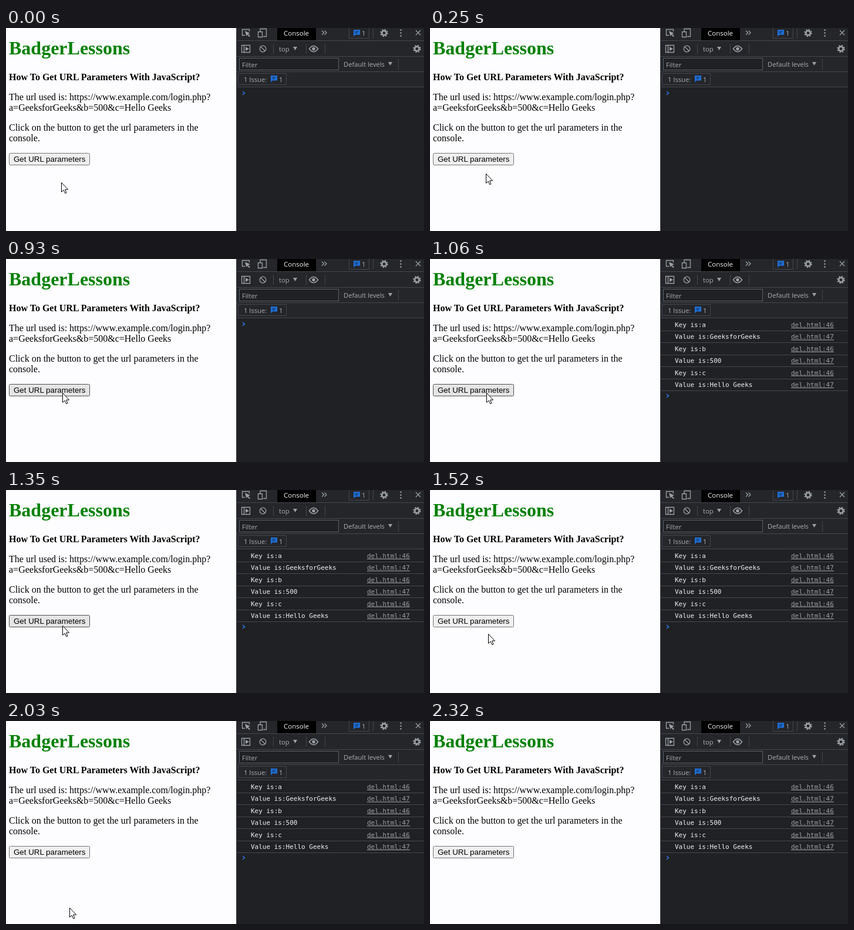
These frames come from a looping animation (712 by 346 pixels, 3.73 s). An HTML page:

```html
<!DOCTYPE html>
<html lang="en">
<head>
<meta charset="utf-8">
<title>URL parameters</title>
<style>
  html, body { margin: 0; width: 100%; height: 100%; overflow: hidden; background: #fdfdff; }
  svg { display: block; width: 100%; height: 100%; }
  text { white-space: pre; }
  .page { font: 16px "Liberation Serif", serif; }
  .ui { font: 11.2px "Open Sans", sans-serif; fill: #a8adb2; }
  .log { font: 11px "DejaVu Sans Mono", monospace; fill: #f0f1f3; }
  .link { fill: #9aa0a6; text-decoration: underline; }
  .icon { fill: none; stroke: #9aa0a6; stroke-width: 1.3; }
  .solid { fill: #9aa0a6; stroke: none; }
  .rule { fill: none; stroke: #44474e; }
  .blue { fill: #1f6fd8; }
  .prompt { fill: none; stroke: #367cf1; stroke-width: 1.4; }
</style>
</head>
<body>
<svg viewBox="0 0 712 346">
  <defs>
    <g id="gear">
      <circle r="3.7" fill="none" stroke="#9aa0a6" stroke-width="2.6"/>
      <circle r="5.7" fill="none" stroke="#9aa0a6" stroke-width="2" stroke-dasharray="2.4 2.077"/>
    </g>
    <g id="note">
      <path class="blue" d="M0 0H11V8.5H3L0 11.5Z"/>
      <path d="M2.5 3H8.5M2.5 5.5H7" stroke="#10243c"/>
    </g>
    <path id="down" class="solid" d="M0 0H7L3.5 6Z"/>
  </defs>

  <rect width="712" height="346" fill="#fdfdff"/>
  <g class="page">
    <text x="5" y="45" font-size="32" font-weight="700" fill="#008000">BadgerLessons</text>
    <text x="5" y="89" font-weight="700">How To Get URL Parameters With JavaScript?</text>
    <text x="5" y="123">The url used is: https://www.example.com/login.php?</text>
    <text x="5" y="141">a=GeeksforGeeks&amp;b=500&amp;c=Hello Geeks</text>
    <text x="5" y="175">Click on the button to get the url parameters in the</text>
    <text x="5" y="193">console.</text>
  </g>
  <rect id="button" x="5.5" y="213.5" width="137" height="20" rx="2"/>
  <text x="13" y="228" font-family="Liberation Sans, Arial, sans-serif" font-size="13.333">Get URL parameters</text>

  <rect x="392" width="320" height="346" fill="#202124"/>
  <rect x="393" width="319" height="100" fill="#25262a"/>
  <rect x="462" width="66" height="21" fill="#000"/>
  <path class="rule" d="M392.5 0V346M393 21.5H712M393 48.5H712M393 74.5H712M393 100.5H712
    M455.5 27V44M511.5 27V44M543.5 27V44M625.5 0V17M668.5 53V71"/>
  <path class="rule" d="M584.5 0V17.5H618.5V0"/>
  <rect class="rule" x="395.5" y="77.5" width="82" height="19"/>
  <rect x="397.5" y="51.5" width="169" height="20" fill="#202124" stroke="#5a5d62"/>

  <g class="icon">
    <path d="M407 12.5H402.5V2.5H414.5V6"/>
    <path class="solid" d="M407 5L416 9L412.5 10.2L416 14L414.5 15.2L411 11.5L409.5 14Z"/>
    <path d="M433 6V1.5H443.5V14.5H438M429.5 6.5H436.5V15.5H429.5Z"/>
    <path d="M538 4.5L541.5 8L538 11.5M542.5 4.5L546 8L542.5 11.5"/>
    <path d="M698 4L706 12M706 4L698 12"/>
    <path d="M401.5 29.5H415.5V41.5H401.5ZM405.5 29.5V41.5"/>
    <path class="solid" d="M408 32L414 35.5L408 39Z"/>
    <circle cx="437.5" cy="35.5" r="5.3"/>
    <path d="M433.8 31.8L441.2 39.2"/>
    <path d="M516.5 35.5Q524 25.5 531.5 35.5Q524 45.5 516.5 35.5Z" stroke-width="1.6"/>
    <circle class="solid" cx="524" cy="35.5" r="2.7"/>
    <g class="solid">
      <circle cx="672.5" cy="3.5" r="1.3"/><circle cx="672.5" cy="8.5" r="1.3"/><circle cx="672.5" cy="13.5" r="1.3"/>
    </g>
  </g>
  <use href="#gear" x="644" y="8.5"/>
  <use href="#gear" x="700" y="35.5"/>
  <use href="#note" x="592" y="3"/>
  <use href="#note" x="451" y="81"/>
  <use href="#down" x="489" y="32"/>
  <use href="#down" x="651" y="58"/>
  <g class="ui">
    <text x="473" y="13" font-size="11.5" style="fill:#f4f5f6">Console</text>
    <text x="606" y="13">1</text>
    <text x="465" y="40">top</text>
    <text x="402" y="67">Filter</text>
    <text x="575" y="66">Default levels</text>
    <text x="405" y="92">1 Issue:</text>
    <text x="465" y="92">1</text>
  </g>

  <g id="log" class="log"></g>
  <path id="prompt" class="prompt" d="M403 -3L406.5 0L403 3"/>
  <path id="cursor" d="M.5 .5V16.5L4.2 13.2L6.7 18.8L9 17.8L6.6 12.2H11.6Z" fill="#fff" stroke="#000"/>
</svg>
<script>
const LOOP = 3730, LOG_AT = 1055;
const $ = id => document.getElementById(id);
const [button, log, prompt, cursor] = ["button", "log", "prompt", "cursor"].map($);

const params = [["a", "GeeksforGeeks"], ["b", "500"], ["c", "Hello Geeks"]];
const lines = params.flatMap(([key, value]) => [["Key is:" + key, 46], ["Value is:" + value, 47]]);
log.innerHTML = lines.map(([text, row], i) => {
  const y = 116 + i * 20.4, edge = Math.round(y + 6) + .5;
  return `<text x="417" y="${y}">${text}</text>
    <text x="615" y="${y}" class="link">del.html:${row}</text>
    <path class="rule" d="M393 ${edge}H712"/>`;
}).join("");

// time, x, y of the pointer tip
const path = [
  [130, 94, 263], [420, 96, 235], [880, 96, 235], [930, 96, 228], [1300, 96, 228],
  [1350, 96, 231], [1430, 97, 236], [1770, 104, 277], [1940, 107, 306], [2310, 112, 348]
];

const slope = (i, k) => (path[i + 1][k] - path[i][k]) / (path[i + 1][0] - path[i][0]);

function tangent(i, k) {
  if (i === 0 || i === path.length - 1) return slope(Math.min(i, path.length - 2), k);
  const a = slope(i - 1, k), b = slope(i, k);
  return a * b > 0 ? 2 * a * b / (a + b) : 0;
}

// monotone cubic through the points
function pointer(t, k) {
  const last = path.length - 1;
  if (t <= path[0][0]) return path[0][k];
  if (t >= path[last][0]) return path[last][k];
  const i = path.findIndex(p => p[0] > t) - 1;
  const h = path[i + 1][0] - path[i][0], u = (t - path[i][0]) / h, v = 1 - u;
  return v * v * (1 + 2 * u) * path[i][k] + u * u * (3 - 2 * u) * path[i + 1][k]
    + h * u * v * (v * tangent(i, k) - u * tangent(i + 1, k));
}

function draw(t) {
  const x = Math.round(pointer(t, 1)), y = Math.round(pointer(t, 2));
  const hover = y < 235, logged = t >= LOG_AT;
  cursor.setAttribute("transform", `translate(${x} ${y})`);
  cursor.setAttribute("visibility", y < 346 ? "visible" : "hidden");
  button.setAttribute("fill", hover ? "#e5e5e5" : "#efefef");
  button.setAttribute("stroke", hover ? "#4f4f4f" : "#767676");
  log.setAttribute("visibility", logged ? "visible" : "hidden");
  prompt.setAttribute("transform", `translate(0 ${logged ? 233 : 111})`);
}

const start = performance.now();
function tick() {
  draw((performance.now() - start) % LOOP);
  requestAnimationFrame(tick);
}
tick();
</script>
</body>
</html>
```
